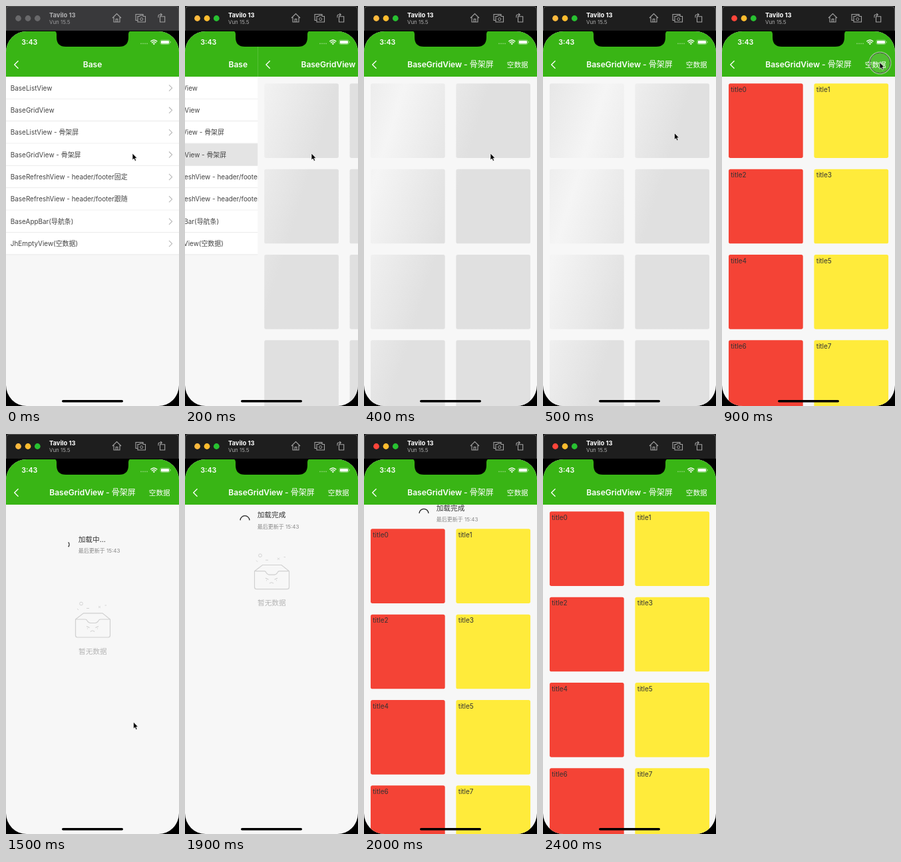
These frames come from a looping animation (260 px wide and 600 px high, 2500 ms). An HTML page:

```html
<!DOCTYPE html>
<html lang="zh-CN">
<head>
<meta charset="utf-8">
<title>Base views</title>
<style>
  html, body { margin: 0; width: 100%; height: 100%; overflow: hidden; background: #000; }
  svg { display: block; width: 260px; height: 600px; }
  text { font-family: Inter, "Noto Sans CJK SC", "Noto Sans CJK", sans-serif; white-space: pre; }
</style>
</head>
<body>
<svg id="stage" viewBox="0 0 260 600"></svg>
<script>
const LOOP = 2500, STEP = 100;
const W = 260, TOP = 38, BAR_END = 106, BODY = 106.3, ROW = 33.37;
const CELL = 111.7, PITCH = 128.35, REST = 46.7;
const GREEN = '#39b515', PAPER = '#f7f7f7';

const text = (s, x, y, size, fill, extra = '') =>
  `<text x="${x}" y="${y + size * 0.36}" font-size="${size}" fill="${fill}" ${extra}>${s}</text>`;
const rect = (x, y, w, h, fill, extra = '') =>
  `<rect x="${x}" y="${y}" width="${w}" height="${h}" fill="${fill}" ${extra}/>`;
const line = (d, color, width = 1, extra = '') =>
  `<path d="${d}" fill="none" stroke="${color}" stroke-width="${width}" ${extra}/>`;

function appBar(title) {
  return rect(0, TOP, W, BAR_END - TOP, GREEN) +
    line('M18.5 82.2L12.7 88L18.5 93.8', '#fff', 1.3) +
    text(title, 130, 87.8, 12, '#fff', 'text-anchor="middle" font-weight="600"');
}

function listPage() {
  const rows = ['BaseListView', 'BaseGridView', 'BaseListView - 骨架屏', 'BaseGridView - 骨架屏',
    'BaseRefreshView - header/footer固定', 'BaseRefreshView - header/footer跟随',
    'BaseAppBar(导航条)', 'JhEmptyView(空数据)'];
  const items = rows.map((label, i) => {
    const y = BODY + i * ROW, mid = y + ROW / 2;
    return rect(0, y, W, ROW, '#fff', i === 3 ? 'id="pressed"' : '') +
      text(label, 6.8, mid, 9.93, '#444') +
      line(`M245 ${mid - 4.6}l4.6 4.6l-4.6 4.6`, '#b8b8b8', 1.1) +
      rect(0, y + ROW - 0.7, W, 0.7, '#dedede');
  });
  return rect(0, TOP, W, 562, PAPER) + items.join('') + appBar('Base');
}

function cells(draw) {
  let out = '';
  for (let i = 0; i < 8; i++) {
    out += draw(i, 10 + (i % 2) * PITCH, BODY + 10 + (i >> 1) * PITCH);
  }
  return out;
}

const skeleton = () => cells((i, x, y) => rect(x, y, CELL, CELL, 'url(#shimmer)', 'rx="2.7"'));
const grid = () => cells((i, x, y) =>
  rect(x, y, CELL, CELL, i % 2 ? '#ffeb3b' : '#f44336', 'rx="2.7"') +
  text('title' + i, x + 3.3, y + 9.2, 10, '#333'));

function emptyView() {
  const c = '#d0d0d0';
  return line('M104.5 159L116.5 149.8H145L156.5 159V183Q156.5 186 153.5 186H107.5Q104.5 186 104.5 183Z' +
      'M104.5 159H119Q121 159 122 161Q124 164.5 127 164.5H134Q137 164.5 139 161Q140 159 142 159H156.5', c, 1.2) +
    line('M121 169.5l4.5 2M139 169.5l-4.5 2M122.5 172.5v1M137.5 172.5v1M127 177.5Q130 174.5 133 177.5', c, 1.1) +
    line('M121 142.5h4M139 142l3-3M139 139l3 3M148.5 138h2.5M107 143l2 2', c, 0.9) +
    `<circle cx="113" cy="135.5" r="2.4" fill="none" stroke="${c}" stroke-width="0.9"/>` +
    text('暂无数据', 130.3, 206.8, 10.67, '#b6b6b6', 'text-anchor="middle"');
}

function gridPage() {
  return rect(0, TOP, W, 562, PAPER) +
    `<g id="scroll"><g id="skeleton">${skeleton()}</g><g id="grid">${grid()}</g><g id="empty">${emptyView()}</g></g>` +
    `<g id="refresh">${line('', '#222', 1.3, 'id="spinner"')}
      ${text('', 108.7, -8, 10.67, '#333', 'id="status"')}
      ${text('最后更新于 15:43', 108.7, 9, 8, '#888')}</g>` +
    appBar('BaseGridView - <tspan font-weight="500">骨架屏</tspan>') +
    rect(205, 69, 52, BAR_END - 69, '#fff', 'id="tap" opacity="0.17"') +
    text('空数据', 214.8, 87.8, 10.67, '#fff');
}

function statusBar() {
  const dots = [203, 206, 209, 212].map(x => `<circle cx="${x}" cy="56.4" r="0.8" fill="#fff" opacity="0.5"/>`);
  return `<path d="M72 37H188Q184 38 184 42V47Q184 61 170 61H90Q76 61 76 47V42Q76 38 72 37Z" fill="#000"/>` +
    text('3:43', 23.3, 54.3, 10.7, '#fff', 'font-weight="600"') + dots.join('') +
    line('M217.3 53.2Q222.3 48.6 227.3 53.2M219 55.2Q222.3 52.2 225.6 55.2', '#fff', 1.4) +
    '<path d="M222.3 58.2l-1.8-1.9q1.8-1.3 3.6 0z" fill="#fff"/>' +
    rect(231.9, 50.9, 14, 6.6, 'none', 'rx="2" stroke="#fff" stroke-width="0.6" opacity="0.6"') +
    rect(232.9, 51.9, 12, 4.6, '#fff', 'rx="1.2"') +
    rect(246.6, 53, 0.9, 2.4, '#fff', 'rx="0.4" opacity="0.6"') +
    rect(84, 591, 92, 3.6, '#000', 'rx="1.8"');
}

function windowBar() {
  const lights = [18.5, 33, 47.3].map(x => `<circle class="light" cx="${x}" cy="18.5" r="4.4"/>`);
  const icons = 'M160 18L166.5 11.5L173 18M162 17V24H171V17M165.2 24V19.5H167.8V24' +
    'M197.5 21.5H195V12.5H206V14.5M198 15.5H200.5L201.5 14.3H205.5L206.5 15.5H209.5V24H198Z' +
    'M231.5 15.8H238.7V24H231.5ZM229 17.5V15Q229 13 231 13H234M232.3 11.2L234.3 13L232.3 14.8';
  return rect(0, 0, W, 37, '#1e1e1e', 'id="bar"') +
    line('M0.5 37V6Q0.5 0.5 6 0.5H254Q259.5 0.5 259.5 6V37', '#555') + lights.join('') +
    text('Tavilo 13', 65, 14, 9.4, '#fff', 'id="device" font-weight="700"') +
    text('Vun 15.5', 65, 24, 7.9, '#aaa', 'id="system"') +
    line(icons, '#a2a2a2', 1.1) +
    '<circle cx="203.7" cy="19.7" r="2" fill="none" stroke="#a2a2a2"/>';
}

const pointer = `<g id="pointer">
  <g id="ring"><circle r="16" cx="0.5" cy="1" fill="#fff" fill-opacity="0.12" stroke="#fff" stroke-width="2" stroke-opacity="0.5"/>
  <circle r="15.5" cx="0.5" cy="1" fill="none" stroke="#333" stroke-width="0.9"/></g>
  <path d="M0 0V10L2.3 8L3.9 11.5L5.6 10.7L4.1 7.3H7Z" fill="#000" stroke="#fff" stroke-width="0.7"/></g>`;

document.getElementById('stage').innerHTML = `<defs>
  <clipPath id="screen"><rect y="${TOP}" width="${W}" height="562" rx="31"/></clipPath>
  <linearGradient id="shimmer" gradientUnits="userSpaceOnUse" x1="${-W}" y1="${BODY}" x2="${2 * W}" y2="${BODY + 247}">
    <stop offset=".35" stop-color="#e0e0e0"/><stop offset=".5" stop-color="#f5f5f5"/><stop offset=".65" stop-color="#e0e0e0"/>
  </linearGradient></defs>
  <g clip-path="url(#screen)"><g id="list">${listPage()}</g><g id="detail">${gridPage()}</g>${statusBar()}</g>
  ${windowBar()}${pointer}`;

const el = id => document.getElementById(id);
const lights = [...document.querySelectorAll('.light')];
const show = (id, on) => el(id).setAttribute('visibility', on ? 'inherit' : 'hidden');
const move = (id, x, y = 0) => el(id).setAttribute('transform', `translate(${x} ${y})`);
const within = (t, a, b) => t >= a && t < b;

// Linear value from rows of [time, value].
function track(rows, t) {
  if (t <= rows[0][0]) return rows[0][1];
  for (let i = 1; i < rows.length; i++) {
    const [t0, a] = rows[i - 1], [t1, b] = rows[i];
    if (t <= t1) return a + (b - a) * (t - t0) / (t1 - t0);
  }
  return rows[rows.length - 1][1];
}

const SLIDE = [[100, 1], [200, 0.42], [300, 0.08], [400, 0]];
const PULL = [[1200, 0], [1300, 62], [1400, 112], [1500, 119], [1600, 72], [1700, REST],
  [1900, REST], [2000, 26], [2100, 7], [2200, 0]];
const POINT_X = [[400, 190], [600, 205], [800, 236], [900, 237], [1000, 234.5], [1200, 191], [1500, 191.5]];
const POINT_Y = [[400, 221], [600, 160], [800, 87], [900, 84.5], [1000, 95], [1200, 250], [1300, 330], [1400, 412], [1500, 432]];

function arc(from, to, r) {
  const p = a => `${90 + r * Math.cos(a)} ${r * Math.sin(a)}`;
  return `M${p(from)}A${r} ${r} 0 0 1 ${p(to)}`;
}

function draw(t) {
  const active = t >= 100;
  const gridOn = within(t, 700, 1000) || t >= 2000;
  const colors = active ? [gridOn ? '#ff453a' : '#fdb93e', '#febc2e', '#28c131'] : Array(3).fill('#69696b');
  lights.forEach((light, i) => light.setAttribute('fill', colors[i]));
  el('bar').setAttribute('fill', active ? '#1e1e1e' : '#39393b');
  el('device').setAttribute('fill', active ? '#fff' : '#b0b0b2');
  el('system').setAttribute('fill', active ? '#aaa' : '#9a9a9c');

  const slide = track(SLIDE, t);
  move('detail', W * slide);
  move('list', -W / 3 * (1 - slide));
  show('list', slide > 0);
  show('detail', slide < 1);
  el('pressed').setAttribute('fill', within(t, 100, 400) ? '#e4e4e4' : '#fff');

  show('skeleton', t < 700);
  show('grid', gridOn);
  show('empty', within(t, 1000, 2000));
  show('tap', within(t, 1000, 1100));
  const sweep = -W + 2 * W * (t + 50) / 1500;
  el('shimmer').setAttribute('gradientTransform', `translate(${sweep} 0)`);

  const pull = track(PULL, t);
  move('scroll', 0, pull);
  move('refresh', 0, BODY + pull / 2);
  show('refresh', pull > 0);
  el('status').textContent = t < 1400 ? '下拉刷新' : t < 1500 ? '释放刷新' : t < 1900 ? '加载中...' : '加载完成';
  const grow = track([[1500, 0], [1900, 1]], t);
  const mid = -Math.PI / 2 * grow, half = 0.75 + 0.78 * grow;
  el('spinner').setAttribute('d', arc(mid - half, mid + half, 5 + 2 * grow));

  move('pointer', track(POINT_X, t), track(POINT_Y, t));
  show('pointer', t < 1800);
  show('ring', within(t, 100, 200) || within(t, 900, 1000) || within(t, 1200, 1500));
}

const start = performance.now();
function tick() {
  const t = (performance.now() - start) % LOOP;
  draw(Math.floor(t / STEP) * STEP);
  requestAnimationFrame(tick);
}
tick();
</script>
</body>
</html>
```
